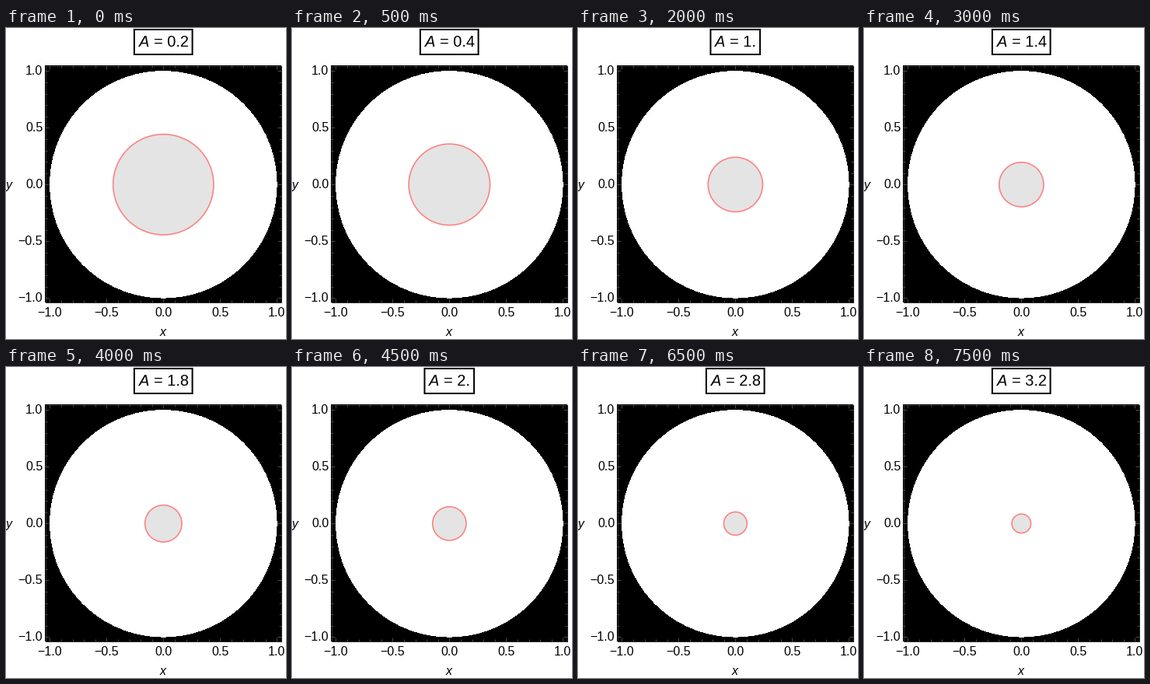
These frames come from a looping animation (360 by 400 pixels, 8000 ms). A matplotlib script:

```python
import math

import matplotlib.pyplot as plt
from matplotlib.animation import FuncAnimation
from matplotlib.patches import Circle, Rectangle

W, H, DPI = 360, 400, 100
PT = 72 / DPI                           # points per pixel
CX, CY, UNIT = 202.35, 201.35, 146      # plot centre and pixels per unit
LEFT, RIGHT, TOP, BOTTOM = 50, 354, 48, 353
FRAMES, INTERVAL = 16, 500
DIGIT = 11.1                            # width of a title digit

plt.rcParams["font.family"] = "Liberation Sans"

fig = plt.figure(figsize=(W / DPI, H / DPI), dpi=DPI, facecolor="white")
ax = fig.add_axes([0, 0, 1, 1])
ax.set_xlim(0, W)
ax.set_ylim(H, 0)
ax.axis("off")


def label(x, y, text, size=16, ha="center", style="normal"):
    return ax.text(x, y, text, fontsize=size * PT, ha=ha, va="baseline",
                   style=style, color="black")


def line(x0, y0, x1, y1):
    ax.plot([x0, x1], [y0, y1], color="#484848", lw=PT,
            solid_capstyle="butt", zorder=3)


def draw_plot():
    ax.add_patch(Rectangle((LEFT, TOP), RIGHT - LEFT, BOTTOM - TOP,
                           fc="black", ec="none"))
    ax.add_patch(Rectangle((LEFT + 0.5, TOP + 0.5), RIGHT - LEFT - 1,
                           BOTTOM - TOP - 1, fc="none", ec="#2c2c2c", lw=PT))
    ax.add_patch(Circle((CX, CY), UNIT - 0.3, fc="white", ec="none",
                        antialiased=False))
    for i in range(-10, 11):
        x, y = CX + UNIT * i / 10, CY - UNIT * i / 10
        size = 5 if i % 5 == 0 else 3
        line(x, TOP, x, TOP + size)
        line(x, BOTTOM, x, BOTTOM - size)
        line(LEFT, y, LEFT + size, y)
        line(RIGHT, y, RIGHT - size, y)
        if i % 5 == 0:
            text = f"{i / 10:.1f}".replace("-", "\u2212")
            label(x, 371, text)
            label(47.2, y + 5, text, ha="right")
    label(202, 396, "x", style="italic")
    label(0, 207, "y", ha="left", style="italic")


def radius(a):
    s = math.log(a)
    return 35.1 - 19.1 * s - 0.47 * s * s


draw_plot()
disc = ax.add_patch(Circle((CX, CY), 1, fc="#e4e4e4", ec="#ff8080",
                           lw=1.6 * PT, zorder=4))
box = ax.add_patch(Rectangle((0, 2), 1, 32, fc="white", ec="black",
                             lw=2 * PT, joinstyle="miter", snap=False))
name = label(0, 24, "A", 20, "left", "italic")
value = label(0, 24, "", 20, "left")


def update(k):
    a = (k + 1) / 5
    text = f"{a:.1f}".removesuffix("0")
    width = 74.7 - DIGIT * (3 - len(text))
    left = 202.25 - width / 2
    disc.set_radius(radius(a))
    box.set_x(left)
    box.set_width(width)
    name.set_x(left + 5.9)
    value.set_x(left + 24.6)
    value.set_text(f"= {text}")
    return disc, box, name, value


anim = FuncAnimation(fig, update, frames=FRAMES, interval=INTERVAL,
                     repeat=True, repeat_delay=0, blit=False)
plt.show()
```
